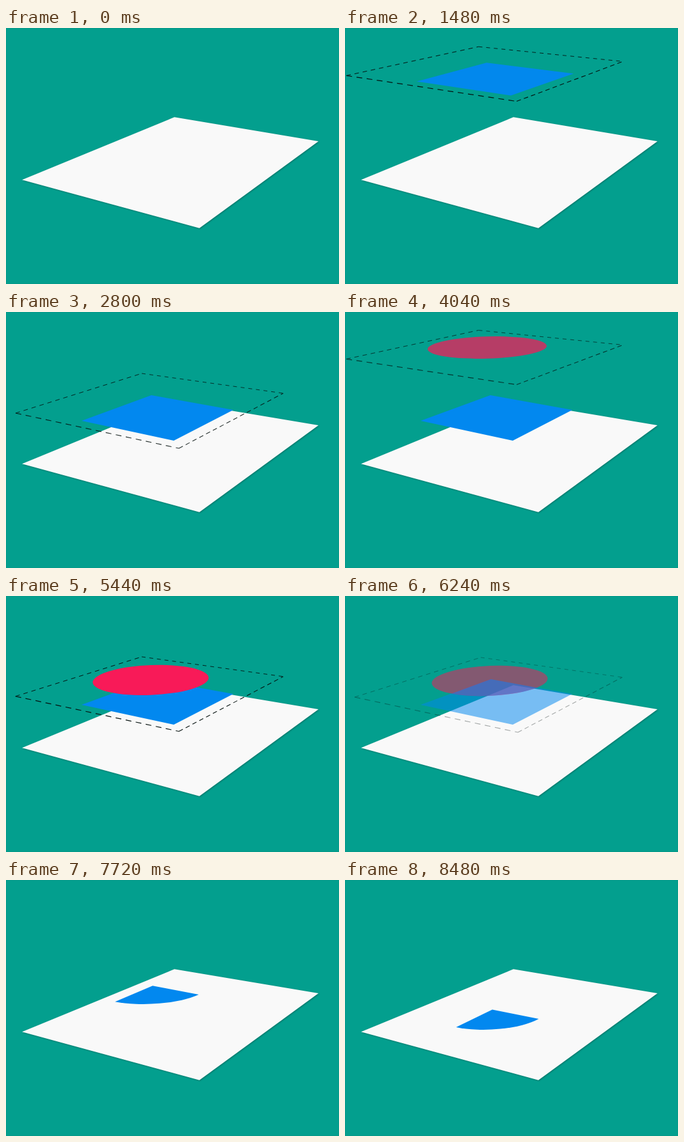
These frames come from a looping animation (520 by 400 pixels, 10000 ms). An HTML page without scripts:

```html
<!DOCTYPE html>
<html lang="en">
<head>
<meta charset="utf-8">
<title>Layers merging on a sheet</title>
<style>
html, body { margin: 0; height: 100%; overflow: hidden; background: #039f8e; }
svg { display: block; width: 520px; height: 400px; }

/* --hi and --lo are a shape's outlines before and after its move */
.move { d: var(--lo); animation: drop 10s var(--late, 0s) infinite both; }
.late { --late: 3.14s; }
.dash { fill: none; stroke: #06110f; }

.back-right {
  --hi: path("M208.5 28.5L434 51.5"); --lo: path("M212 96L433 127");
  stroke-width: .9; stroke-dasharray: 6 6;
}
.front-right {
  --hi: path("M268 113.5L434 51.5"); --lo: path("M270 213L433 127");
  stroke-width: 1.1; stroke-dasharray: 7 5;
}
.front-left {
  --hi: path("M2 73.5L268 113.5"); --lo: path("M15 158L270 213");
  stroke-width: 1.2; stroke-dasharray: 9 7;
}
.back-left {
  --hi: path("M2 73.5L208.5 28.5"); --lo: path("M15 158L212 96");
  stroke-width: 1; stroke-dasharray: 7 6;
}

.square {
  --hi: path("M221 53.5L357 70.5L259 104.5L112 82.5Z");
  --lo: path("M227 130L355 153L262 201L118 170Z");
}
.circle {
  --hi: path("M129 58A93 17.2 -1.6 1 1 315 53A93 17.2 -1.6 1 1 129 58Z");
  --lo: path("M135.5 136A90.5 23.4 -2.4 1 1 316.5 129A90.5 23.4 -2.4 1 1 135.5 136Z");
}
.sector {
  --hi: path("M228 130L299.5 143.2A90.5 23.3 -2.4 0 1 167 152.5Z");
  --lo: path("M230 202.5L302.5 217A88 28.4 -3 0 1 173.5 230Z");
  d: var(--lo);
  animation: land 10s infinite, reveal 10s infinite;
}

.frame1 { animation: frame1 10s infinite; }
.frame2 { animation: frame2 10s infinite; }
.show1 { animation: show1 10s infinite; }
.show2 { animation: show2 10s infinite; }

@keyframes drop {
  0%, 14.6% { d: var(--hi); }
  24.6%, 100% { d: var(--lo); }
}
@keyframes land {
  0%, 74.2% { d: var(--hi); }
  84.7%, 100% { d: var(--lo); }
}
@keyframes reveal {
  0%, 59.6% { opacity: 0; }
  69.6%, 100% { opacity: 1; }
}
@keyframes frame1 {
  0%, 7%, 36.8%, 100% { opacity: 0; }
  16%, 26.8% { opacity: 1; }
}
@keyframes frame2 {
  0%, 36%, 68.6%, 100% { opacity: 0; }
  46%, 58.6% { opacity: 1; }
}
@keyframes show1 {
  0%, 7%, 69.6%, 100% { opacity: 0; }
  16%, 59.6% { opacity: 1; }
}
@keyframes show2 {
  0%, 36%, 69.6%, 100% { opacity: 0; }
  46%, 59.6% { opacity: 1; }
}

.sheet { fill: #f9f9f9; filter: drop-shadow(1.5px 1px 1px rgba(0, 0, 0, .28)); }
.blue { fill: #0288ef; }
.red { fill: #f81a58; }
</style>
</head>
<body>
<svg viewBox="0 0 520 400">
  <rect width="520" height="400" fill="#039f8e"/>
  <rect x=".5" y=".5" width="519" height="399" fill="none" stroke="#05988a"/>
  <path class="sheet" d="M263 139.3L488 177L302 312.8L25 237.3Z"/>

  <g class="show1"><path class="move square blue"/></g>
  <g class="dash frame1">
    <path class="move back-right"/>
    <path class="move front-right"/>
    <path class="move front-left"/>
    <path class="move back-left"/>
  </g>

  <g class="late show2"><path class="move circle red"/></g>
  <g class="late dash frame2">
    <path class="move back-right"/>
    <path class="move front-right"/>
    <path class="move front-left"/>
    <path class="move back-left"/>
  </g>

  <path class="sector blue"/>
</svg>
</body>
</html>
```
